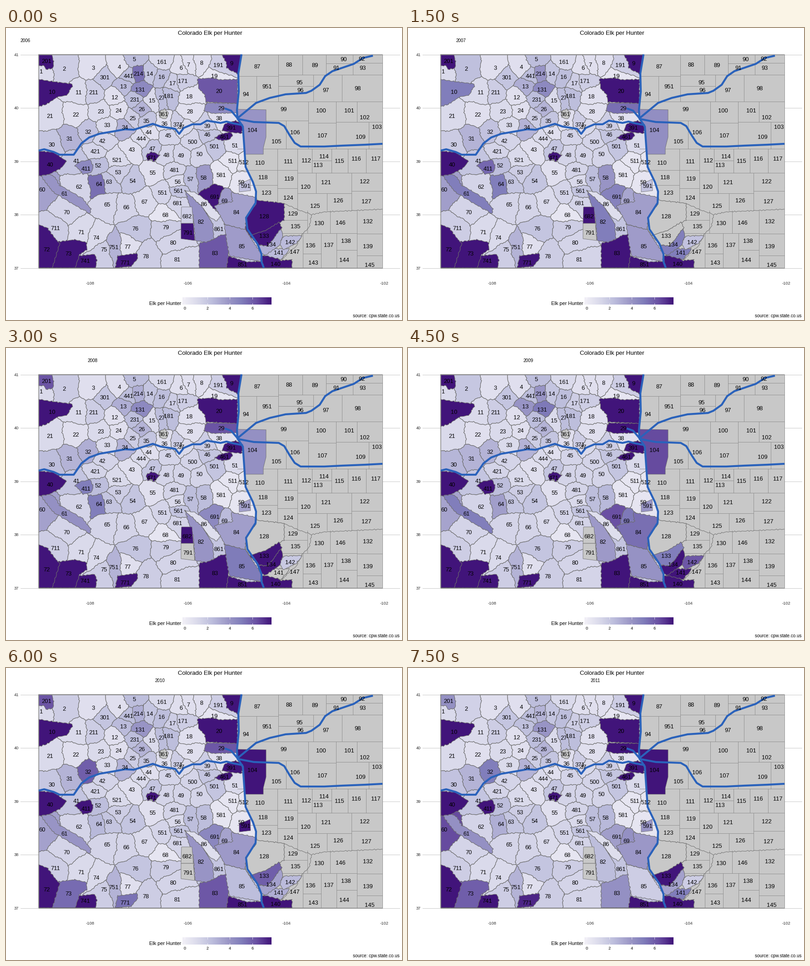
Write a matplotlib script that moves like this. It is 871 px wide and 643 px high and loops after 8000 ms.

```python
import numpy as np
import matplotlib.pyplot as plt
from matplotlib.animation import FuncAnimation
from matplotlib.colors import LinearSegmentedColormap

W, H, DPI = 871, 643, 128
PX = 72 / DPI
LEFT, RIGHT, TOP, BOTTOM = 72, 828, 58.5, 528.5
GREY = (0.785, 0.785, 0.785, 1)
EDGE, THIN = "#6c6c6c", "#8f8f8f"
N = None

purples = LinearSegmentedColormap.from_list("elk", [
    "#f2f0f7", "#dadaeb", "#bcbddc", "#9e9ac8", "#807dba", "#6a51a3", "#41147a"])

plt.rcParams["font.family"] = "Liberation Sans"
fig = plt.figure(figsize=(W / DPI, H / DPI), dpi=DPI, facecolor="white")
ax = fig.add_axes([0, 0, 1, 1])
ax.set(xlim=(0, W), ylim=(H, 0))
ax.axis("off")

units = []
seeds = []


def color(value):
    return GREY if value is None else purples((value + 0.2) / 7.9)


def text(x, y, s, size=12.9, ha="center", c="black"):
    return ax.text(x, y + 0.355 * size, s, fontsize=size * PX, ha=ha,
                   va="baseline", color=c, zorder=6)


def dense(p, closed=True):
    ends = np.roll(p, -1, axis=0) if closed else p[1:]
    out = []
    for a, b in zip(p, ends):
        n = max(1, int(np.hypot(*(b - a)) / 3))
        out.append(a + (b - a) * np.arange(n)[:, None] / n)
    return np.vstack(out + ([] if closed else [p[-1:]]))


def wiggle(p, meander=0):
    """Shift points by a fixed field, so shared borders stay shared."""
    x, y = p.T
    room = np.minimum.reduce([x - LEFT, RIGHT - x, y - TOP, BOTTOM - y])
    amp = np.clip(room / 6, 0, 1)
    dx = (0.8 * np.sin(0.43 * x + 0.61 * y) + 0.6 * np.sin(0.23 * x - 0.97 * y)
          + meander * np.sin(0.09 * x + 0.17 * y))
    dy = (0.8 * np.sin(0.67 * x - 0.37 * y) + 0.6 * np.sin(0.91 * x + 0.29 * y)
          + meander * np.sin(0.16 * x - 0.11 * y))
    return np.column_stack([x + amp * dx, y + amp * dy])


def fill(p, values, z, lw=1.1):
    """Add an area with one value, or one per year."""
    if not isinstance(values, tuple):
        values = (values,) * 6
    patch = plt.Polygon(p, ec=EDGE, lw=lw * PX, joinstyle="round", zorder=z)
    ax.add_patch(patch)
    units.append((patch, values))


def unit(name, x, y, values, *points, rough=True):
    """A unit with its own outline; earlier ones lie above later ones."""
    p = np.clip(np.array(points, float), (LEFT, TOP), (RIGHT, BOTTOM))
    fill(wiggle(dense(p)) if rough else p, values,
         3.9 - 0.01 * len(units), 1.1 if rough else 0.8)
    text(x, y, name)


def cells(values, *labels):
    """Units whose outline follows from their neighbours' labels."""
    for name, x, y in labels:
        seeds.append((x, y, values))
        text(x, y, str(name))


def cut(poly, middle, normal):
    """Keep the part of a polygon behind a line."""
    side = (poly - middle) @ normal
    out = []
    for i, p in enumerate(poly):
        q, a, b = poly[i - 1], side[i - 1], side[i]
        if (a <= 0) != (b <= 0):
            out.append(q + (p - q) * a / (a - b))
        if b <= 0:
            out.append(p)
    return np.array(out)


def draw_cells():
    at = np.array([s[:2] for s in seeds], float)
    state = np.array([(LEFT, TOP), (RIGHT, TOP), (RIGHT, BOTTOM), (LEFT, BOTTOM)])
    for i, p in enumerate(at):
        poly = state
        for q in np.delete(at, i, axis=0):
            poly = cut(poly, (p + q) / 2, q - p)
        fill(wiggle(dense(poly), 1.6), seeds[i][2], 1)


def survey(labels, x0, y0, x1, y1):
    """Split a box at its widest gaps until each label has its own part."""
    if len(labels) < 2:
        return
    best = None
    for axis in (1, 2):
        row = sorted(labels, key=lambda s: s[axis])
        for i in range(1, len(row)):
            a, b = row[i - 1][axis], row[i][axis]
            score = (b - a) * min(i, len(row) - i) ** 0.4
            if best is None or score > best[0]:
                best = score, axis, (a + b) / 2, row[:i], row[i:]
    _, axis, m, low, high = best
    if axis == 1:
        line((m, y0), (m, y1))
        survey(low, x0, y0, m, y1)
        survey(high, m, y0, x1, y1)
    else:
        line((x0, m), (x1, m))
        survey(low, x0, y0, x1, m)
        survey(high, x0, m, x1, y1)


def line(*points, rough=False):
    p = np.array(points, float)
    if rough:
        p = wiggle(dense(p, False))
    ax.plot(*p.T, color=EDGE if rough else THIN, lw=0.9 * PX, zorder=2.1)


def road(*points):
    ax.plot(*np.transpose(points), color="#2a62bb", lw=4.3 * PX, zorder=4,
            solid_joinstyle="round", solid_capstyle="butt")


# Frame of the chart
for i in range(5):
    y = TOP + 117.5 * i
    ax.plot([32, 866], [y, y], color="#c4c4c4", lw=0.9 * PX, zorder=0)
    text(28, y, str(41 - i), 9.4, "right", "#333333")
for i in range(4):
    text(184.5 + 216 * i, 562, str(2 * i - 108), 9.4, c="#333333")
text(449, 10.5, "Colorado Elk per Hunter", 13.2)
text(866, 633.5, "source: cpw.state.co.us", 9.9, "right")
year = text(43, 27, "2006", 9.9)

# Legend
text(385, 606, "Elk per Hunter", 11, "right")
ax.imshow(np.linspace(0, 1, 256)[None], cmap=purples, aspect="auto",
          extent=(388, 584, 609, 593), zorder=1)
for v in (0, 2, 4, 6):
    x = 393 + 24.8 * v
    text(x, 616.5, str(v), 9)
    for a, b in ((593, 596.5), (605.5, 609)):
        ax.plot([x, x], [a, b], color="white", lw=0.7 * PX, zorder=2)

# Highways
divide = [(518, 58), (511, 100), (512, 140), (508, 180), (509, 199), (521, 217),
          (526, 290), (527, 306), (543, 339), (550, 360), (549, 385), (528, 418),
          (531, 443), (553, 475), (562, 498), (562, 515), (567, 528)]
road(*divide)
road((72, 270), (84, 267), (105, 273), (118, 279), (149, 279), (166, 254), (183, 241),
     (205, 233), (240, 227), (262, 223), (281, 224), (323, 211), (340, 217), (372, 222),
     (381, 233), (391, 220), (410, 212), (428, 212), (442, 204), (472, 209), (485, 206),
     (500, 210), (521, 214))
road((508, 200), (545, 207), (600, 209), (612, 216), (625, 238), (635, 253), (648, 261),
     (700, 261), (740, 259), (790, 257), (828, 255))
road((481, 177), (495, 182), (513, 203))
road((510, 198), (550, 165), (580, 154), (615, 146), (660, 143), (672, 138), (690, 125),
     (702, 106), (718, 95), (765, 79), (785, 66), (807, 61))

# Grey plains east of the divide
ax.add_patch(plt.Polygon(divide + [(RIGHT, BOTTOM), (RIGHT, TOP)],
                         fc=GREY, ec="none", zorder=2))
ax.add_patch(plt.Rectangle((LEFT, TOP), RIGHT - LEFT, BOTTOM - TOP, fc="none",
                           ec=THIN, lw=0.8 * PX, zorder=3.95))

# Units with an outline of their own
unit("104", 542, 224, (4, 4.3, 4.2, 6.5, 7.7, 7.7), (509, 179), (572, 180), (572, 240),
     (566, 264), (566, 278), (526, 278), (523, 225), (509, 200), rough=False)
unit("682", 398, 414, (1.6, 7.7, 7.7, N, N, N),
     (386, 394), (409, 394), (412, 430), (385, 430), rough=False)
unit("791", 400, 450, (7.7, N, N, N, N, N),
     (385, 430), (412, 430), (415, 468), (385, 464), rough=False)
unit("591", 527, 347, (2.2, 2.2, 3.5, 4, 7.7, 4),
     (513, 342), (526, 338), (537, 333), (538, 358), (513, 361), rough=False)
unit("201", 89, 72.5, (7.7, 7.7, 6.3, 7.7, 6.3, 4.2),
     (72, 58), (101, 58), (105, 77), (103, 89), (88, 91), (84, 83), (72, 83))
unit("10", 101, 140.5, (7.7, 5, 7.7, 7.7, 7.7, 7.7), (72, 113), (103, 118), (145, 123),
     (147, 128), (133, 148), (113, 152), (88, 168), (72, 173))
unit("9", 496, 77.5, 7.7, (475, 58), (518, 58), (511, 102), (485, 88), (485, 76))
unit("20", 469, 138.5, (6.2, 7.7, 7.7, 7.7, 7.7, 7.7), (421, 112), (455, 110), (472, 114),
     (509, 113), (509, 166), (440, 163), (437, 148), (424, 133))
unit("29", 474, 176.5, (4.5, 5.5, 6.3, 7.7, 6.2, 7.7),
     (441, 165), (509, 166), (509, 187), (455, 188), (435, 182))
unit("391", 495, 219, 7.7, (482, 211), (505, 204), (520, 210), (519, 232), (497, 230),
     (474, 226))
unit("461", 480, 239, 7.7, (459, 242), (472, 234), (494, 229), (499, 236), (490, 246),
     (474, 248))
unit("40", 97, 300.5, 7.7, (72, 271), (105, 274), (134, 294), (120, 309), (96, 322), (72, 326))
unit("411", 176, 309, (4.5, 5.7, 5, 7.7, 7.7, 7.7),
     (152, 303), (164, 294), (185, 290), (192, 305), (188, 318), (170, 322))
unit("471", 321, 285, 7.7, (308, 279), (320, 272), (338, 280), (326, 295), (320, 288), (312, 293))
unit("61", 129, 364.5, (4, 5, 4.2, 5, 4, 4.2), (77, 325), (97, 322), (110, 331), (118, 346),
     (168, 375), (187, 398), (185, 409), (146, 387), (102, 360))
unit("86", 436, 387, 0.9, (393, 358), (416, 362), (442, 380), (472, 414), (464, 425),
     (450, 418), (426, 388))
unit("82", 429, 426.5, (4.2, 5, 4, 3.8, 4, 2.4), (393, 357), (430, 392), (455, 431),
     (457, 464), (440, 472), (416, 468), (412, 415))
unit("133", 568, 457.5, (7.7, N, 7.7, 5, 6, 7.7), (536, 457), (570, 446), (601, 428),
     (606, 440), (576, 480), (553, 477))
unit("134", 583, 476.5, (3, 5, 7.7, 7.7, 3.5, 3.5), (553, 478), (576, 480), (605, 441),
     (609, 456), (601, 480), (572, 500), (562, 497))
unit("142", 625, 471.5, (2.5, 2.2, 1.9, 6.2, 2.5, 1.7), (601, 473), (612, 458), (651, 457),
     (640, 474), (610, 488))
unit("141", 600, 494.5, (2.5, 5, N, 7.7, 3, 5), (566, 500), (590, 486), (624, 486), (606, 510))
unit("84", 507, 405.5, (3.5, 3.6, 3.6, 5.5, 3.8, 3.9), (470, 388), (498, 382), (495, 362),
     (551, 373), (549, 388), (528, 418), (526, 444), (481, 432), (458, 392))
unit("85", 519, 480, (3.7, 3.7, 5.1, 4.1, 2.4, 1.7), (480, 432), (527, 444), (562, 498),
     (560, 514), (492, 502), (487, 480))
unit("83", 460, 495.5, (6.2, 7.7, 7.7, 7.7, 6.2, 4.2), (425, 474), (455, 466), (470, 457),
     (490, 453), (491, 485), (485, 528), (425, 528))
unit("851", 520, 520, 7.7, (485, 528), (488, 502), (530, 515), (562, 514), (567, 528))
unit("140", 593, 519, 7.7, (566, 528), (562, 502), (584, 501), (605, 512), (629, 510), (629, 528))
unit("128", 568, 414.5, (7.7, N, N, N, N, N), (550, 379), (612, 386), (612, 423), (570, 446),
     (537, 457), (527, 443), (528, 419))
unit("72", 90, 487.5, 7.7, (72, 433), (90, 440), (118, 475), (102, 528), (72, 528))
unit("73", 138, 496, (7.7, 7.7, 7.7, 7.7, 5.6, 6), (112, 471), (152, 466), (177, 472),
     (178, 488), (162, 499), (152, 528), (102, 528))
unit("741", 174, 512.5, 7.7, (158, 502), (195, 498), (200, 510), (197, 528), (152, 528))
unit("771", 262, 516, (7.7, 7.7, 7.7, 7.7, 5.4, 7.3), (246, 502), (288, 496), (290, 506),
     (276, 525), (240, 528))
unit("361", 346, 189.5, N, (337, 184), (348, 178), (358, 188), (351, 200), (338, 197))

# Units that change a little
cells((5.5, 4, 3, 4, 3, 2.8), (214, 291, 100.5))
cells((4.5, 4.5, 4.5, 5.2, 4, 4), (131, 295, 135))
cells((2.5, 3, 3, 4, 2.5, 2.3), (13, 258, 128))
cells((2.2, 2.2, 3, 2.8, 6, 5), (32, 181, 228))
cells((5.5, 5, 5, 3.6, 2.6, 3), (64, 205, 343))
cells((3.5, 3.6, 3.5, 3.4, 3.5, 6.5), (60, 80, 355))
cells((3.8, 4, 2.4, 2.6, 2.4, 2.6), (58, 435, 329.5))
cells((7.7, 4.8, 4.5, 6.4, 4.6, 3.6), (691, 459, 371))
cells((3.7, 3.3, 2.5, 5.2, 3.4, 4.2), (69, 481, 380))
cells((1.7, 2.3, 1.8, 2, 1.7, 1.5), (2, 128, 89.5))
cells((2.1, 1.8, 2.4, 2.7, 2, 2.2), (30, 101, 256))

# Steady units, from dark to pale
cells(2.8, (751, 237, 482.5), (26, 298, 178.5), (34, 262, 218), (31, 140, 243.5))
cells(2.4, (231, 283, 157), (27, 343, 153.5), (52, 203, 302.5), (57, 406, 332.5),
      (441, 270, 105), (5, 282, 68.5), (16, 342, 107.5), (181, 358, 149))
cells(2.1, (14, 316, 100.5), (301, 217, 108.5), (501, 458, 260), (46, 443, 234.5),
      (47, 322, 265.5), (54, 279, 336.5), (561, 379, 358.5), (861, 468, 442),
      (41, 155, 292), (63, 226, 338), (76, 285, 441), (35, 309, 204.5))
cells(1.7, (17, 366, 121.5), (171, 389, 116.5), (191, 467, 81.5), (211, 193, 141.5),
      (25, 279, 198.5), (371, 378, 212), (39, 443, 215.5), (79, 352, 438),
      (711, 109, 440.5), (75, 216, 487.5), (53, 247, 317.5), (78, 308, 502))
cells(1.4, (50, 426, 277.5), (45, 357, 236.5), (500, 410, 250), (49, 385, 280.5),
      (48, 353, 279), (42, 212, 248), (81, 377, 509), (80, 368, 472), (65, 222, 388),
      (66, 264, 394.5), (70, 134, 405.5), (681, 377, 385), (481, 370, 312.5),
      (551, 344, 362.5), (62, 161, 349.5), (421, 197, 271.5))
cells(1.1, (161, 343, 74), (1, 78, 95), (11, 160, 141.5), (15, 321, 159), (33, 223, 213.5),
      (521, 244, 290.5), (51, 504, 258), (56, 378, 338), (67, 305, 382), (71, 166, 449),
      (74, 199, 461.5), (37, 386, 217), (444, 298, 243), (23, 208, 183), (21, 97, 193.5))
cells(0.8, (3, 192, 87.5), (4, 249, 85), (6, 385, 87), (7, 401, 80.5), (8, 430, 76.5),
      (12, 239, 152), (18, 403, 150), (22, 154, 190.5), (24, 248, 181.5), (28, 404, 183.5),
      (36, 349, 210), (38, 469, 198.5), (43, 277, 267.5), (44, 314, 229.5),
      (55, 323, 318.5), (77, 268, 481.5))
cells(0.5, (19, 458, 105), (68, 351, 411.5), (581, 473, 323.5), (59, 518, 339),
      (511, 499, 292.5), (512, 523, 295))
draw_cells()

# Plains units, cut into plots on both sides of the river
north = [
    (87, 553, 84), (88, 623, 80), (89, 680, 81), (90, 743, 68), (91, 727, 87),
    (92, 783, 67.5), (93, 785, 87), (94, 528, 145), (951, 574, 128), (95, 646, 119.5),
    (96, 648, 136), (97, 704, 136), (98, 774, 132.5), (99, 611, 178), (100, 693, 181.5),
    (101, 755, 181.5), (102, 789, 196.5), (103, 816, 217), (105, 595, 249.5),
    (106, 636, 229.5), (107, 696, 236.5), (109, 780, 239.5), (110, 558, 296.5),
    (111, 621, 293.5), (112, 660, 291), (113, 686, 301), (114, 699, 282), (115, 733, 292),
    (116, 770, 287), (117, 813, 287), (118, 565, 328.5), (119, 622, 331.5),
    (120, 659, 349), (121, 704, 339.5), (122, 789, 337), (123, 573, 362.5),
    (124, 621, 373.5), (125, 680, 391), (126, 731, 379), (127, 793, 381)]
south = [
    (129, 631, 408.5), (130, 689, 429.5), (132, 796, 425), (135, 637, 436.5),
    (136, 670, 478.5), (137, 710, 477.5), (138, 748, 468), (139, 796, 480),
    (143, 676, 516), (144, 744, 510.5), (145, 800, 521), (146, 736, 428),
    (147, 635, 492.5)]
for name, x, y in north + south:
    text(x, y, str(name))
survey(north, 509, TOP, RIGHT, 402)
survey(south, 550, 402, RIGHT, BOTTOM)
line((550, 380), (612, 387), (645, 401), (672, 411), (700, 405), (765, 402), (828, 399), rough=True)
line((672, 411), (668, 436), (650, 457), (640, 478), (606, 511), rough=True)


def update(frame):
    k = frame // 3
    year.set_text(str(2006 + k))
    year.set_x(43 + 73.8 * k)
    for patch, values in units:
        patch.set_facecolor(color(values[k]))


anim = FuncAnimation(fig, update, frames=16, interval=500, repeat=True, repeat_delay=0)
plt.show()
```
